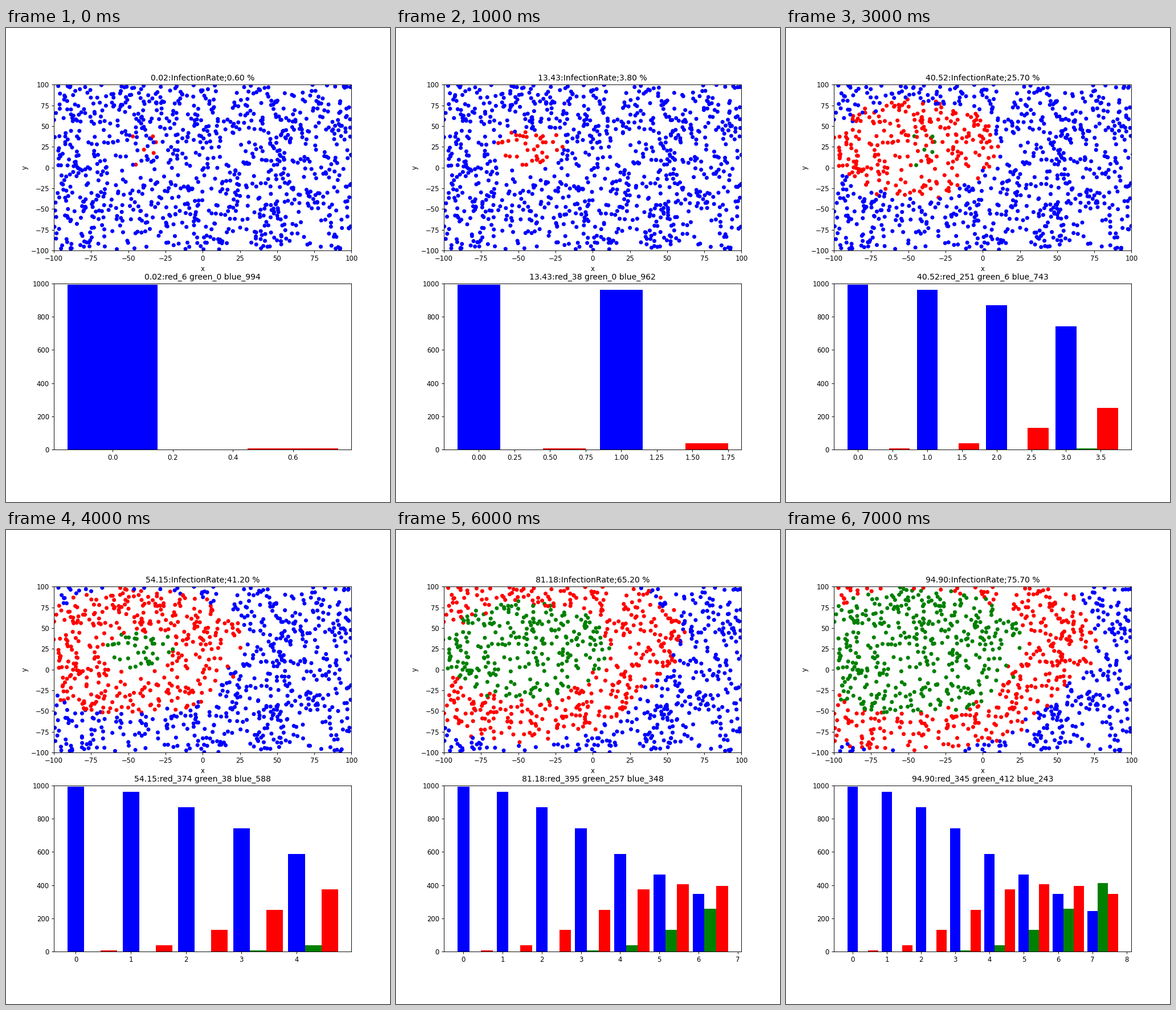
Animation of 674 by 831 pixels, one loop 8000 ms. Source, as a matplotlib script:

```python
import numpy as np
import matplotlib.pyplot as plt
from matplotlib.animation import FuncAnimation

W, H, DPI = 674, 831, 84
N, STEPS, SICK_STEPS = 1000, 8, 3
TIMES = [0.02, 13.43, 26.92, 40.52, 54.15, 67.50, 81.18, 94.90]
INFECTED = np.array([6, 38, 131, 257, 412, 535, 652, 757])  # cumulative
GREEN = np.concatenate([np.zeros(SICK_STEPS, int), INFECTED[:-SICK_STEPS]])
RED = INFECTED - GREEN
BLUE = N - INFECTED

FIRST = [(-47, 37.5), (-33.5, 37.5), (-31.5, 30.5),
         (-39.5, 21.5), (-33, 17.5), (-45, 3.5)]

rng = np.random.default_rng(12)


def infection_rank(pos):
    """Order in which people catch it: a front spreading from the first cases."""
    dx, dy = (pos - (-44, 22)).T
    angle = np.degrees(np.arctan2(dy, dx))
    slow = 1 + 0.15 * np.exp(-((angle + 30) / 28) ** 2)
    reach = np.hypot(dx, dy) * slow + rng.normal(0, 2.5, N)
    reach[:len(FIRST)] = -100
    return np.argsort(np.argsort(reach))


start = rng.uniform(-100, 100, (N, 2))
start[:len(FIRST)] = FIRST
rank = infection_rank(start)
drift = rng.normal(0, 0.35, (STEPS, N, 2))
drift[0] = 0
paths = start + np.cumsum(drift, axis=0)
draw_order = rng.permutation(N)

fig, (field, chart) = plt.subplots(
    2, 1, figsize=((W + 1e-6) / DPI, (H + 1e-6) / DPI), dpi=DPI)
fig.subplots_adjust(left=84.2 / W, right=606.4 / W,
                    top=1 - 99.2 / H, bottom=1 - 738.8 / H)


def draw(i):
    field.clear()
    chart.clear()

    color = np.where(rank < GREEN[i], "green",
                     np.where(rank < INFECTED[i], "red", "blue"))
    x, y = paths[i][draw_order].T
    field.scatter(x, y, s=25, c=color[draw_order], linewidths=1)
    field.set(xlim=(-100, 100), ylim=(-100, 100), xlabel="x", ylabel="y",
              title=f"{TIMES[i]:.2f}:InfectionRate;{INFECTED[i] / N * 100:.2f} %")

    k = np.arange(i + 1)
    for shift, counts, c in ((0, BLUE, "blue"), (0.3, GREEN, "green"),
                             (0.6, RED, "red")):
        chart.bar(k + shift, counts[:i + 1], width=0.3, color=c)
    chart.set(ylim=(0, N),
              title=f"{TIMES[i]:.2f}:red_{RED[i]} green_{GREEN[i]} blue_{BLUE[i]}")


anim = FuncAnimation(fig, draw, frames=STEPS, interval=1000,
                     init_func=lambda: None, repeat=True)
plt.show()
```
